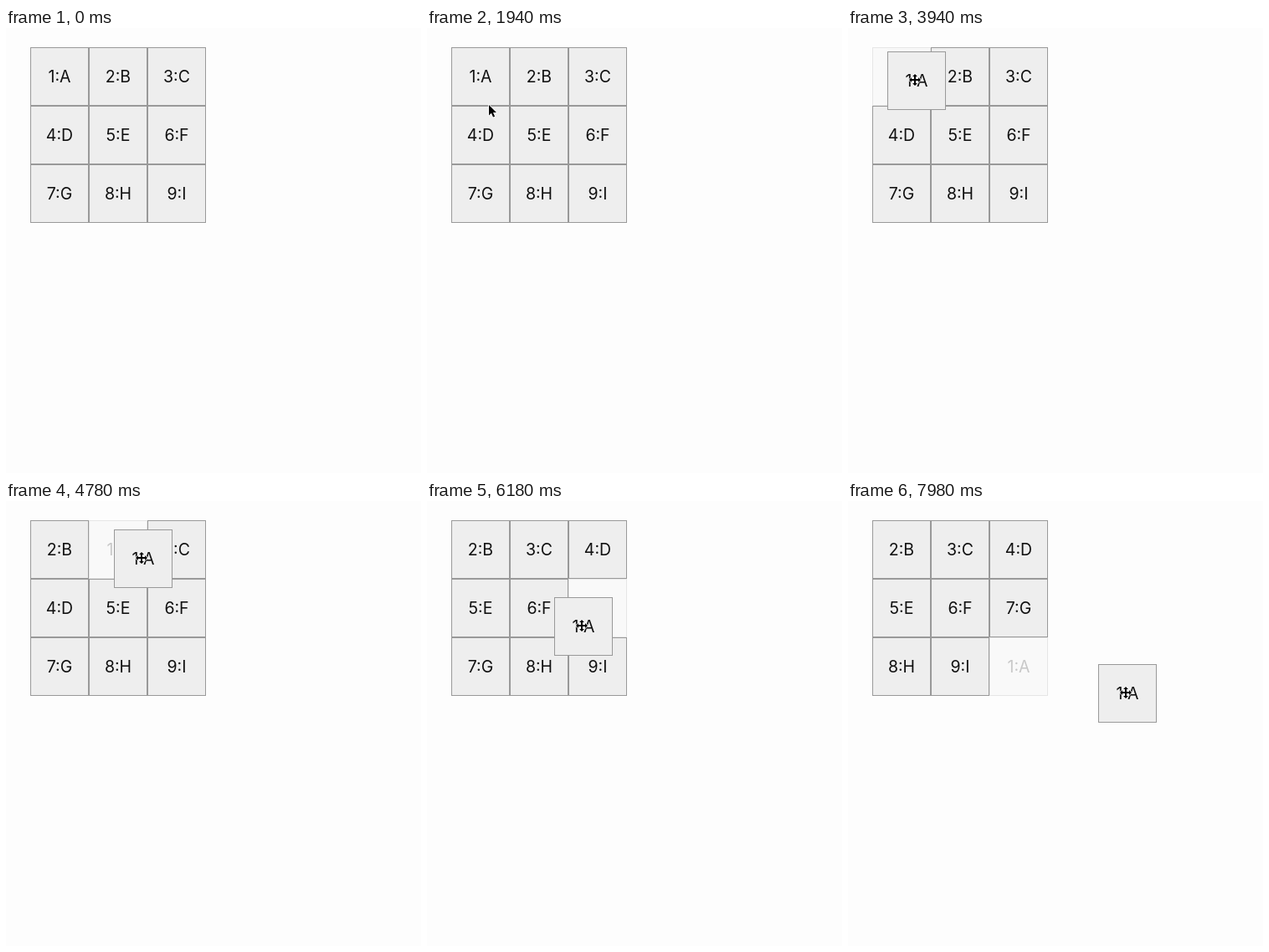
Recreate the animation shown at these times as an HTML page. Size 496 px wide and 532 px high, loop 8000 ms.

```html
<!DOCTYPE html>
<html lang="en">
<head>
<meta charset="utf-8">
<title>Sortable grid</title>
<style>
  html, body { margin: 0; width: 100%; height: 100%; overflow: hidden; background: #fdfdfd; }
  body { position: relative; }
  .cell {
    position: absolute; left: 0; top: 0; width: 70px; height: 70px; box-sizing: border-box;
    border: 1px solid #999; background: #eee; color: #111;
    font: 19.5px/68px Inter, "Liberation Sans", sans-serif; text-align: center;
  }
  .ghost { opacity: .22; }
  svg { position: absolute; left: 0; top: 0; overflow: visible; }
  svg path { stroke: #fff; stroke-width: 1.6; stroke-linejoin: round; paint-order: stroke; }
</style>
</head>
<body>
<svg id="arrow" width="12" height="17"><path d="M0 0V12.5L2.9 9.8L5 14.6L7.1 13.7L5 9H9Z"/></svg>
<svg id="move" width="1" height="1"><path d="M0-7L3-4H1V-1H4V-3L7 0L4 3V1H1V4H3L0 7L-3 4H-1V1H-4V3L-7 0L-4-3V-1H-1V-4H-3Z"/></svg>
<script>
const LOOP = 8000, LEFT = 29, TOP = 23, SIZE = 70;
const ENTER = 9, PICK = 70, GRAB = { x: 33, y: 34 };

// Pointer path, joined by smooth curves: [step, x, y]
const path = [
  [ENTER, 466, 528], [25, 50, 210], [40, 74, 92], [46, 75, 64], [PICK, 62, 57], [84, 80, 62],
  [102, 162, 68], [120, 201, 58], [132, 185, 149], [150, 342, 142], [163, 215, 200], [170, 332, 229]
];

const arrow = document.getElementById("arrow"), move = document.getElementById("move");

function addCell(text) {
  const el = document.createElement("div");
  el.className = "cell";
  el.textContent = text;
  document.body.insertBefore(el, arrow);
  return el;
}
const cells = [..."ABCDEFGHI"].map((c, i) => addCell(`${i + 1}:${c}`));
const dragged = addCell("1:A");

const place = (el, x, y) => el.style.transform = `translate(${x}px,${y}px)`;
const show = (el, on) => el.style.visibility = on ? "visible" : "hidden";

// Three steps every 140 ms: one held for 100 ms, then two of 20 ms.
function stepAt(ms) {
  const t = ms - 20, phase = (t + 140) % 140;
  return 3 * Math.floor(t / 140) + (phase >= 120 ? 2 : phase >= 100 ? 1 : 0);
}

function slope(i, k) {
  const a = path[Math.max(i - 1, 0)], b = path[Math.min(i + 1, path.length - 1)];
  return (b[k] - a[k]) / (b[0] - a[0]);
}

function pointerAt(n) {
  let i = 0;
  while (i < path.length - 2 && path[i + 1][0] <= n) i++;
  const a = path[i], b = path[i + 1], d = b[0] - a[0];
  const u = Math.min(1, Math.max(0, (n - a[0]) / d)), v = 1 - u;
  return [1, 2].map(k => Math.round(
    a[k] * v * v * (1 + 2 * u) + b[k] * u * u * (1 + 2 * v) +
    d * u * v * (slope(i, k) * v - slope(i + 1, k) * u)));
}

// The dragged item takes the last slot the pointer crossed.
function slotAt(n) {
  let slot = 0;
  for (let s = PICK; s <= n; s++) {
    const [x, y] = pointerAt(s);
    const col = Math.floor((x - LEFT) / SIZE), row = Math.floor((y - TOP) / SIZE);
    if (col >= 0 && col < 3 && row >= 0 && row < 3) slot = row * 3 + col;
  }
  return slot;
}

function draw(ms) {
  const n = stepAt(ms), dragging = n >= PICK;
  const [x, y] = pointerAt(n), slot = slotAt(n);

  cells.forEach((el, i) => {
    const pos = i === 0 ? slot : i <= slot ? i - 1 : i;
    place(el, LEFT + pos % 3 * SIZE, TOP + Math.floor(pos / 3) * SIZE);
  });
  cells[0].classList.toggle("ghost", dragging);

  place(dragged, x - GRAB.x, y - GRAB.y);
  place(arrow, x, y);
  place(move, x, y);
  show(dragged, dragging);
  show(move, dragging);
  show(arrow, n >= ENTER && !dragging);
}

const start = performance.now();
function tick() {
  draw((performance.now() - start) % LOOP);
  requestAnimationFrame(tick);
}
tick();
</script>
</body>
</html>
```
